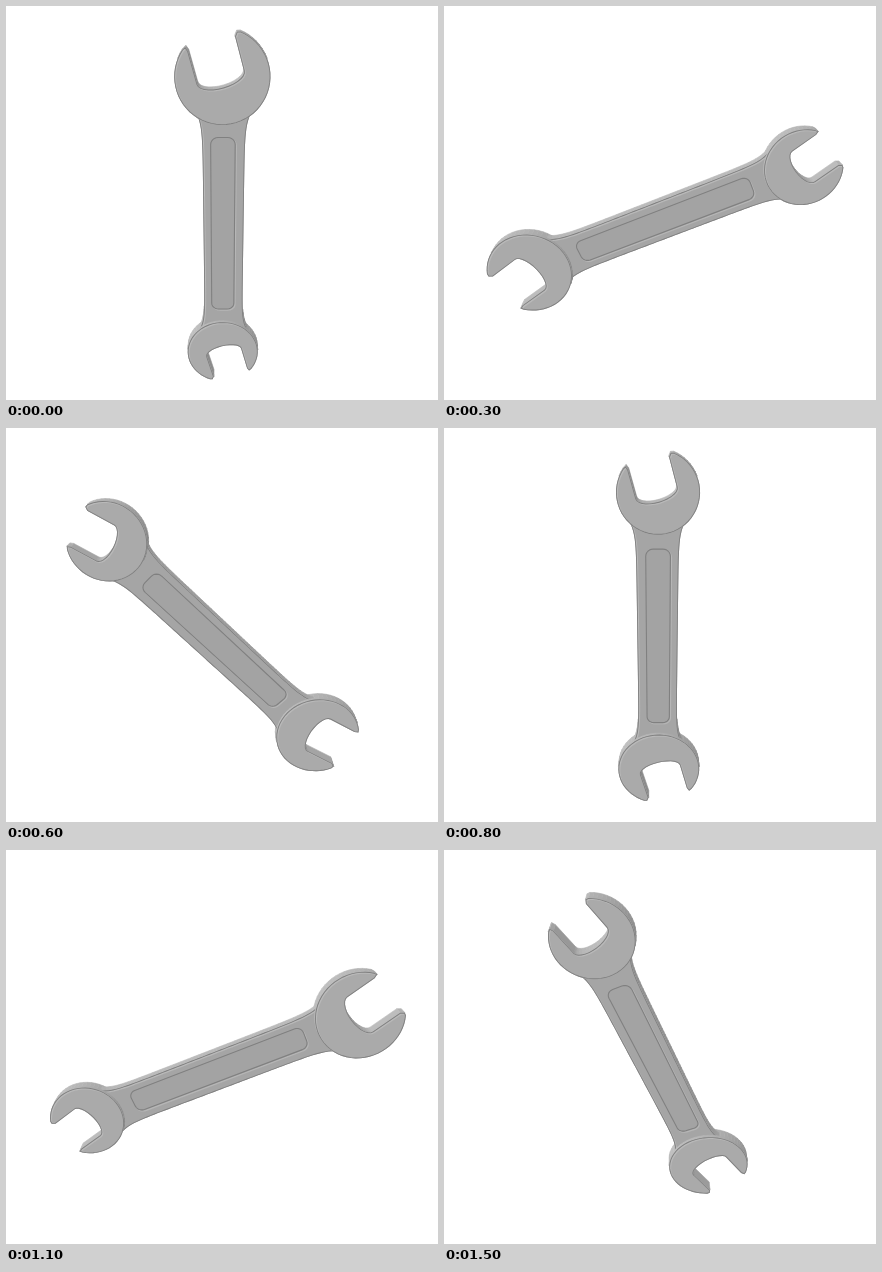
Write an HTML page with a canvas that moves like this. It is 432 px wide and 394 px high and loops after 1.6 s.

```html
<!DOCTYPE html>
<html lang="en">
<head>
<meta charset="utf-8">
<title>Spinning wrench</title>
<style>
  html, body { margin: 0; width: 100%; height: 100%; overflow: hidden; background: #fff; }
  canvas { display: block; }
</style>
</head>
<body>
<canvas id="stage" width="432" height="394"></canvas>
<script>
const ctx = document.getElementById('stage').getContext('2d');
const { PI, sin, cos, exp, hypot, floor, round, max } = Math;
const STEP = 100, STEPS = 16, DEG = PI / 180;
const PIVOT = { x: 215.5, y: 217 }, DISTANCE = 640;
const HEAD = { back: -9, front: 4 }, SHAFT = { back: -8, front: 1 };

// n + 1 points of a curve between two parameter values
const curve = (from, to, n, f) =>
  Array.from({ length: n + 1 }, (_, i) => f(from + (to - from) * i / n));

// Open jaw: nearly round outside, elliptic mouth, leaning 16 degrees
function jaw(cx, cy, scale, turn) {
  const a = turn + 16 * DEG, c = scale * cos(a), s = scale * sin(a);
  return [
    ...curve(42 * DEG, 320 * DEG, 48, t => {
      const r = 43.6 - 2.8 * cos(t);
      return [-r * sin(t), r * cos(t)];
    }),
    [23.5, 32.5], [20.8, 29],
    ...curve(0, PI, 14, t => [-1.5 + 22 * cos(t), -2 - 9.5 * sin(t)]),
    [-23, 28.5], [-24.5, 32.5]
  ].map(([x, y]) => [cx + x * c - y * s, cy + x * s + y * c]);
}

const heads = [jaw(0, 147, 1, 0), jaw(2, -152.6, 0.87, PI)];

// Bar that flares out towards both heads
const halfWidth = v => 20 + 7 * exp((v - 114) / 11) + 5 * exp((-122 - v) / 10);
const shaft = [
  ...curve(112, -123, 60, v => [2 - halfWidth(v), v]),
  ...curve(-123, 112, 60, v => [2 + halfWidth(v), v])
];

function roundRect(l, b, r, t, rad) {
  return [[r - rad, t - rad], [l + rad, t - rad], [l + rad, b + rad], [r - rad, b + rad]]
    .flatMap(([x, y], q) => curve(q * PI / 2, (q + 1) * PI / 2, 6,
      a => [x + rad * cos(a), y + rad * sin(a)]));
}
const panel = roundRect(-10.3, -98, 13, 88, 7);

const view = {};

function setView(turn, tilt) {
  Object.assign(view, { c: cos(turn), s: sin(turn), flat: cos(tilt), depth: sin(tilt) });
}

function project([u, v], z) {
  const x = u * view.c + v * view.s, y = v * view.c - u * view.s;
  const s = 1 / (1 - (y * view.depth + z * view.flat) / DISTANCE);
  return [PIVOT.x + x * s, PIVOT.y - (y * view.flat - z * view.depth) * s];
}

function trace(pts) {
  ctx.beginPath();
  pts.forEach(([x, y]) => ctx.lineTo(x, y));
  ctx.closePath();
}

function outline(pts, color, width, shift = 0) {
  ctx.save();
  ctx.translate(shift, shift);
  trace(pts);
  ctx.strokeStyle = color;
  ctx.lineWidth = width;
  ctx.stroke();
  ctx.restore();
}

// Visible side walls between two depths
function walls(shape, back, front) {
  const f = shape.map(p => project(p, front));
  const b = shape.map(p => project(p, back));
  f.forEach((p, i) => {
    const j = (i + 1) % f.length, q = f[j];
    const nx = p[1] - q[1], ny = q[0] - p[0], len = hypot(nx, ny);
    if (!len || (b[i][0] - p[0]) * nx + (b[i][1] - p[1]) * ny <= 0) return;
    const g = round(158 - 20 * ny / len - 26 * nx / len);
    trace([p, q, b[j], b[i]]);
    ctx.fillStyle = ctx.strokeStyle = `rgb(${g},${g},${g})`;
    ctx.lineWidth = 0.6;
    ctx.fill();
    ctx.stroke();
  });
}

function face(shape, z, fill) {
  const pts = shape.map(p => project(p, z));
  ctx.save();
  trace(pts);
  ctx.fillStyle = fill;
  ctx.fill();
  ctx.clip();
  outline(pts, '#b9b9b9', 1.6, 1.1);
  outline(pts, '#808080', 1.8);
  ctx.restore();
}

function draw(turn, tilt) {
  setView(turn, tilt);
  ctx.fillStyle = '#fff';
  ctx.fillRect(0, 0, 432, 394);
  ctx.lineJoin = 'round';

  heads.forEach(h => walls(h, HEAD.back, HEAD.front));
  walls(shaft, SHAFT.back, SHAFT.front);
  face(shaft, SHAFT.front, '#a5a5a5');

  const inset = panel.map(p => project(p, SHAFT.front));
  outline(inset, '#b6b6b6', 1.2, 1.1);
  trace(inset);
  ctx.fillStyle = '#a3a3a3';
  ctx.fill();
  outline(inset, '#808080', 1.1);

  heads.forEach(h => {
    walls(h, SHAFT.front, HEAD.front);
    face(h, HEAD.front, '#aaaaaa');
  });
}

// Steady spin that swaps ends now and then and leans back before the loop closes
function pose(step) {
  const swapped = (step > 0 && step < 5) || step > 8;
  const lean = max(0, step - 12) / 3;
  return [(step + (swapped ? 8 : 0)) * PI / 8, (22.6 + 13 * lean) * DEG];
}

let shown = -1;
function tick() {
  const step = floor(performance.now() / STEP) % STEPS;
  if (step !== shown) draw(...pose(shown = step));
  requestAnimationFrame(tick);
}
tick();
</script>
</body>
</html>
```
